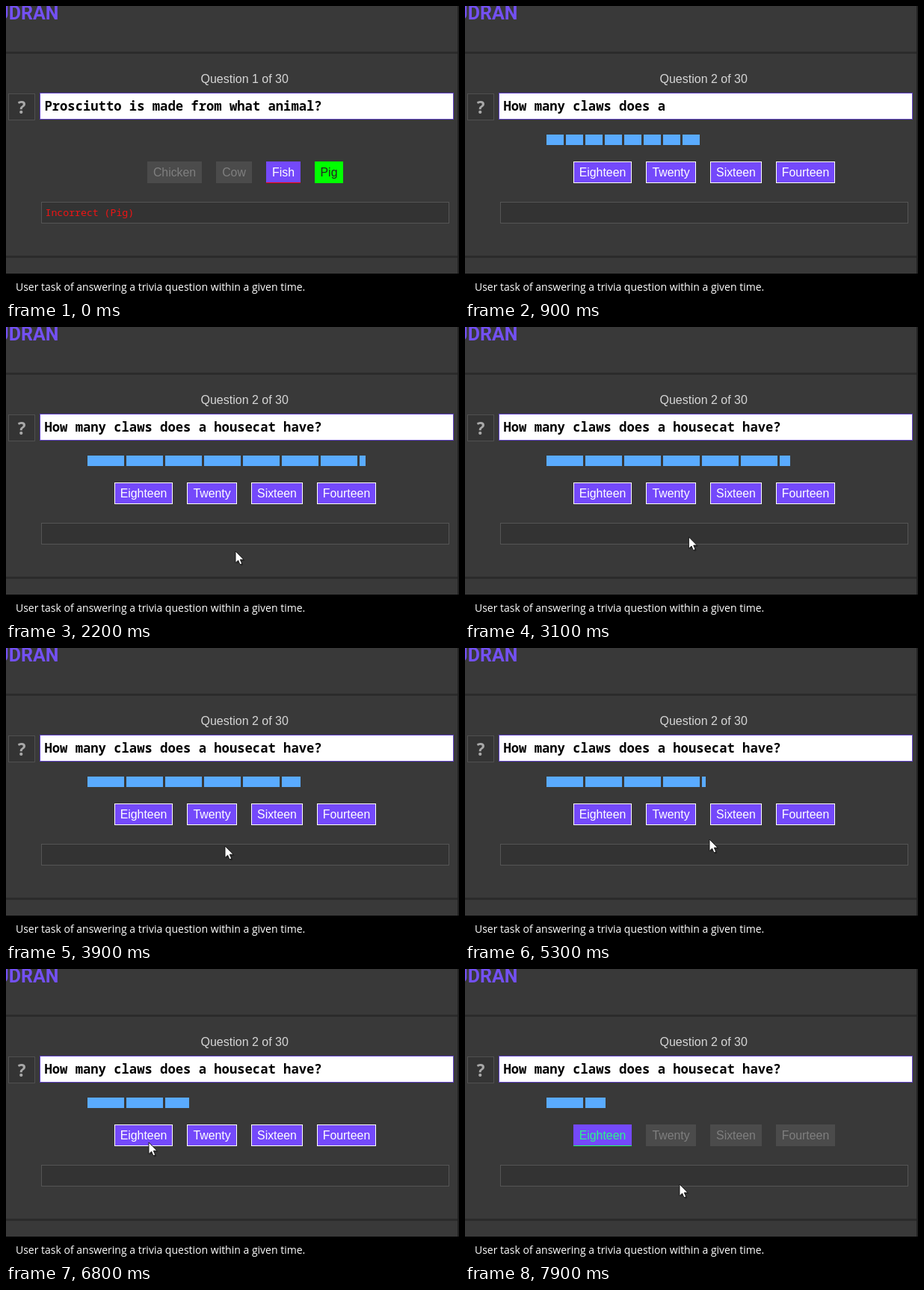
An HTML page that plays this animation: 606x392 px, repeating every 8000 ms.

```html
<!DOCTYPE html>
<html lang="en">
<head>
<meta charset="utf-8">
<title>Trivia question</title>
<style>
html, body { margin: 0; width: 100%; height: 100%; overflow: hidden; background: #000; }
svg { display: block; width: 606px; height: 392px; }
text { white-space: pre; }
.sans { font: 16px "Liberation Sans", Arial, sans-serif; }
.mono { font-family: "Noto Sans Mono", "DejaVu Sans Mono", monospace; }
.caption { font: 14px "Open Sans", "Noto Sans", sans-serif; }
.logo { font: 700 25px Roboto, sans-serif; }
.answer { font-size: 15.85px; text-anchor: middle; }
</style>
</head>
<body>
<svg id="stage" viewBox="0 0 606 392"></svg>
<script>
const LOOP = 8000;
const NEXT = 200;          // second question appears
const TYPE_STEP = 1000 / 30;
const GROW = [460, 1400];  // timer cells widen
const SECONDS = 8, BAR_X = 109, CELL = 52, GAP = 3;
const LOCK = 7000, MARK = 7300;
const QUESTION = "How many claws does a housecat have?";
const VIOLET = "#7449fb";

// time, x, y of the pointer tip
const PATH = [
  [1850, 322, 352], [2200, 307, 300], [3900, 293, 265], [5300, 327, 256],
  [6300, 205, 234], [6800, 191, 232], [7250, 194, 232], [7750, 287, 288]
];

const STYLES = {
  open:  { fill: VIOLET, stroke: "#fff", ink: "#fff" },
  off:   { fill: "#4b4b4b", ink: "#7f7f7f" },
  wrong: { fill: VIOLET, line: "#f00", ink: "#fff" },
  key:   { fill: "#0f0", ink: "#222" },
  right: { fill: VIOLET, line: "#2f6", ink: "#2cf58c" }
};

const stage = document.getElementById("stage");

function add(tag, attrs, parent = stage) {
  const el = document.createElementNS("http://www.w3.org/2000/svg", tag);
  for (const k in attrs) el.setAttribute(k, attrs[k]);
  return parent.appendChild(el);
}
const rect = (x, y, width, height, fill, parent) => add("rect", { x, y, width, height, fill }, parent);

function frame(x, y, w, h, fill, stroke) {
  add("rect", { x: x + .5, y: y + .5, width: w - 1, height: h - 1, fill, stroke });
}
function label(x, y, cls, fill, str, extra, parent) {
  const el = add("text", { x, y, class: cls, fill, ...extra }, parent);
  el.textContent = str;
  return el;
}
function show(el, on) {
  el.setAttribute("visibility", on ? "visible" : "hidden");
}

function button(x, w, str) {
  const g = add("g", {});
  const box = add("rect", { x: x + .5, y: 208.5, width: w - 1, height: 28 }, g);
  const line = rect(x, 236, w, 1, "none", g);
  const text = label(x + w / 2, 228, "sans answer", "#fff", str, {}, g);
  return {
    g,
    paint(name) {
      const s = STYLES[name];
      box.setAttribute("fill", s.fill);
      box.setAttribute("stroke", s.stroke || s.fill);
      line.setAttribute("fill", s.line || "none");
      text.setAttribute("fill", s.ink);
    }
  };
}

// Fixed page
rect(0, 0, 606, 358, "#393939");
rect(0, 61, 604, 3, "#2b2b2b");
rect(0, 334, 604, 3, "#2b2b2b");
rect(604, 0, 2, 358, "#222");
rect(0, 358, 606, 34, "#000");
label(70.5, 18, "logo", "#7350f2", "UDRAN", { "text-anchor": "end" });
frame(3, 117, 36, 36, "#343434", "#505050");
label(21, 144, "mono", "#a8a8a8", "?", { "font-size": 23, "font-weight": 700, "text-anchor": "middle" });
frame(45, 116, 554, 36, "#fff", "#5d3fc4");
frame(47, 262, 546, 29, "#333", "#555");
label(13, 381, "caption", "#fff", "User task of answering a trivia question within a given time.");

// Changing parts
const heading = label(260.5, 103, "sans", "#d6d6d6", "");
const prompt = label(51.4, 140, "mono", "#000", "", { "font-size": 17.2, "font-weight": 700 });
const verdict = label(52.5, 281, "mono", "#f01414", "Incorrect (Pig)", { "font-size": 13.2 });
const first = [[189, 73, "Chicken"], [281, 48, "Cow"], [348, 46, "Fish"], [413, 38, "Pig"]].map(b => button(...b));
["off", "off", "wrong", "key"].forEach((s, i) => first[i].paint(s));
const second = [[145, 78, "Eighteen"], [242, 67, "Twenty"], [328, 69, "Sixteen"], [416, 79, "Fourteen"]].map(b => button(...b));
const cells = Array.from({ length: SECONDS }, () => rect(BAR_X, 172, 0, 14, "#5aabff"));

const pointer = add("g", {});
const ARROW = "M0 0V15.5L3.6 12.2L6 17.8L8.7 16.6L6.3 11.2H11Z";
add("path", { d: ARROW, fill: "#000", opacity: .35, transform: "translate(1.6 1.6)" }, pointer);
add("path", { d: ARROW, fill: "#fff", stroke: "#111", "stroke-width": .9 }, pointer);

function pointerAt(t) {
  if (t >= PATH.at(-1)[0]) return PATH.at(-1).slice(1);
  const i = PATH.findIndex(p => p[0] > t);
  const [t0, x0, y0] = PATH[i - 1], [t1, x1, y1] = PATH[i];
  const u = (t - t0) / (t1 - t0), k = u * u * (3 - 2 * u);
  return [x0 + (x1 - x0) * k, y0 + (y1 - y0) * k];
}

function drawTimer(t) {
  const grown = Math.min(1, Math.max(0, (t - GROW[0]) / (GROW[1] - GROW[0])));
  const width = Math.round((CELL - GAP) * grown);
  const end = t < GROW[1] ? Infinity : BAR_X + SECONDS * CELL - GAP - (t - GROW[1]) * .0513;
  cells.forEach((c, i) => {
    const x = BAR_X + i * (width + GAP);
    c.setAttribute("x", x);
    c.setAttribute("width", Math.max(0, Math.min(width, Math.round(end - x))));
  });
}

function draw(t) {
  const later = t >= NEXT;
  const typed = Math.floor((t - NEXT) / TYPE_STEP + .01);
  heading.textContent = `Question ${later ? 2 : 1} of 30`;
  prompt.textContent = later ? QUESTION.slice(0, typed) : "Prosciutto is made from what animal?";
  show(verdict, !later);
  first.forEach(b => show(b.g, !later));
  second.forEach((b, i) => {
    show(b.g, later);
    b.paint(i ? (t < LOCK ? "open" : "off") : (t < MARK ? "open" : "right"));
  });
  drawTimer(t);
  show(pointer, t >= PATH[0][0]);
  if (t >= PATH[0][0]) {
    const [x, y] = pointerAt(t);
    pointer.setAttribute("transform", `translate(${x.toFixed(1)} ${y.toFixed(1)})`);
  }
}

const start = performance.now();
function tick() {
  draw((performance.now() - start) % LOOP);
  requestAnimationFrame(tick);
}
tick();
</script>
</body>
</html>
```
